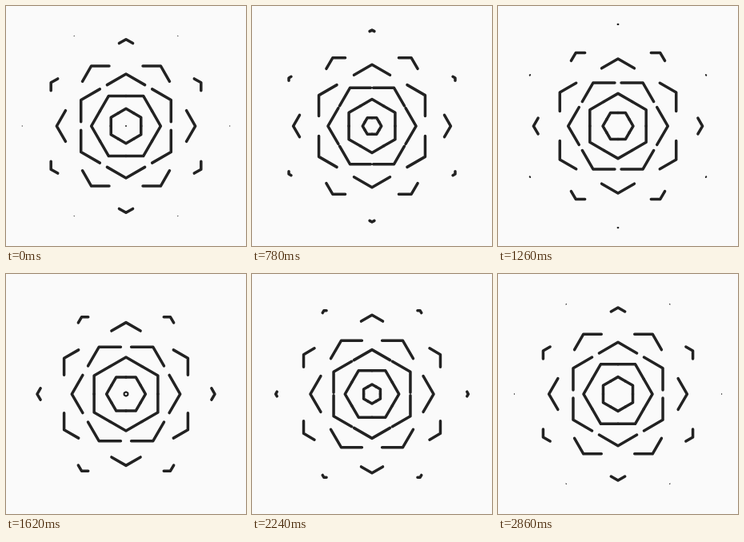
Recreate the animation shown at these times as an HTML page with a canvas. Size 300x300 px, loop 2880 ms.

```html
<!DOCTYPE html>
<html lang="en">
<head>
<meta charset="utf-8">
<title>Unfolding hexagons</title>
<style>
  html, body { margin: 0; width: 100%; height: 100%; overflow: hidden; background: #fafafa; }
  canvas { display: block; }
</style>
</head>
<body>
<canvas id="stage" width="300" height="300"></canvas>
<script>
const ctx = document.getElementById('stage').getContext('2d');
const LOOP = 2880, STEP = 20;
const RINGS = 6, MAX_R = 130, OPEN_R = 45, WEIGHT = 3.5;

const clamp = (x, lo, hi) => Math.min(hi, Math.max(lo, x));

const ease = u => u < 0.5
  ? 0.5 * (2 * u) ** 1.5
  : 1 - 0.5 * (2 - 2 * u) ** 1.5;

const vertex = (radius, angle) => [
  150 + radius * Math.cos(angle),
  150 + radius * Math.sin(angle)
];

const mix = (a, b, k) => a.map((v, i) => v + (b[i] - v) * k);

function drawRing(radius, turn) {
  // Each edge splits in the middle and its halves shrink to the corners.
  const opened = ease(clamp((radius - OPEN_R) / (MAX_R - OPEN_R), 0, 1));
  const arm = Math.max(1 - opened, 0.005) / 2;
  const margin = Math.min(radius, MAX_R - radius);
  ctx.lineWidth = Math.min(WEIGHT, 1 + 0.35 * margin);

  for (let i = 0; i < 6; i++) {
    const [prev, corner, next] = [-1, 0, 1].map(
      d => vertex(Math.max(radius, 0.1), turn + (i + d) * Math.PI / 3));
    ctx.beginPath();
    ctx.moveTo(...mix(corner, prev, arm));
    ctx.lineTo(...corner);
    ctx.lineTo(...mix(corner, next, arm));
    ctx.stroke();
  }
}

function draw(now) {
  const time = Math.floor(now / STEP) * STEP % LOOP;
  const shift = 2 * time / LOOP;

  ctx.fillStyle = '#fafafa';
  ctx.fillRect(0, 0, 300, 300);
  ctx.strokeStyle = '#222';
  ctx.lineCap = ctx.lineJoin = 'round';

  for (let i = -1; i <= RINGS; i++) {
    const pos = i + shift;
    if (pos >= 0 && pos <= RINGS) {
      drawRing(pos * MAX_R / RINGS, i % 2 ? Math.PI / 6 : 0);
    }
  }
}

function tick() {
  draw(performance.now());
  requestAnimationFrame(tick);
}
tick();
</script>
</body>
</html>
```
